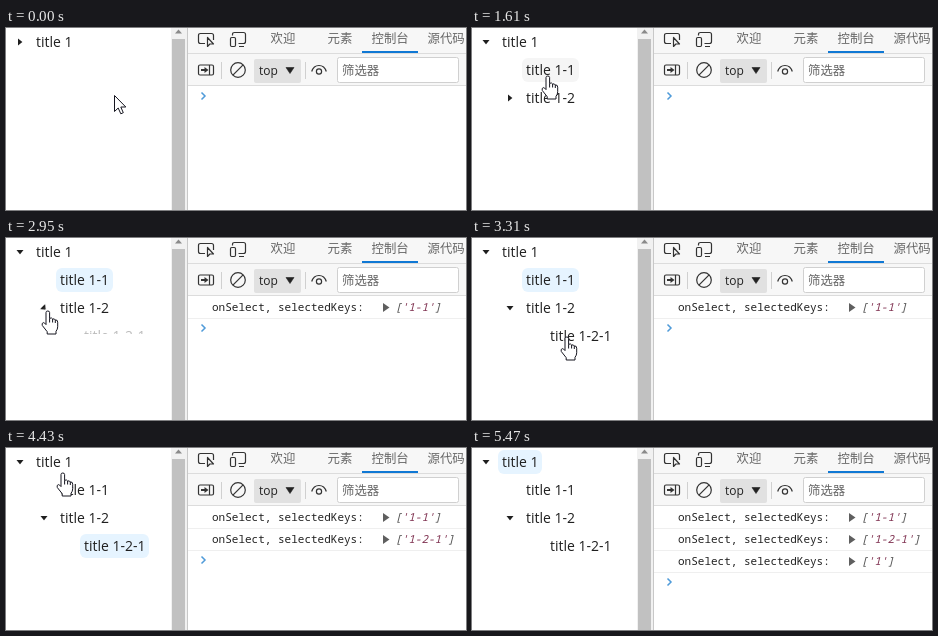
Write an HTML page that moves like this. It is 460x182 px and loops after 5980 ms.

```html
<!DOCTYPE html>
<html lang="zh">
<head>
<meta charset="utf-8">
<title>Tree select demo</title>
<style>
  html, body { margin: 0; width: 100%; height: 100%; overflow: hidden; background: #fff; }
  .stage { position: relative; width: 460px; height: 182px; overflow: hidden; background: #fff; }
  .stage > svg { position: absolute; left: 0; top: 0; }

  /* every moving part shares one clock and changes in hard steps */
  .anim { animation: 5980ms step-end infinite; }

  /* tree */
  .row { position: relative; height: 28px; }
  .row span {
    position: absolute; top: 2px; left: 26px; padding: 0 4px; border-radius: 6px;
    font: 14px/24px "Open Sans", "Noto Sans", sans-serif; color: #1f1f1f; white-space: pre;
  }
  .lvl2 span { left: 50px; }
  .lvl3 span { left: 74px; }
  .caret { position: absolute; left: 9px; top: 9px; width: 10px; height: 10px; }
  .lvl2 .caret { left: 33px; }
  .kids { overflow: hidden; height: 0; opacity: 0; }
  .kids.outer { animation-name: outer; }
  .kids.inner { animation-name: inner; }
  .turn1 { animation-name: turn1; }
  .turn2 { animation-name: turn2; }
  .bg1 { animation-name: bg1; }
  .bg11 { animation-name: bg11; }
  .bg12 { animation-name: bg12; }
  .bg121 { animation-name: bg121; }

  @keyframes outer {
    0% { height: 0; opacity: 0; }
    15.38% { height: 12px; opacity: .13; }
    17.72% { height: 38px; opacity: .65; }
    19.73% { height: 54px; opacity: .95; }
    21.73% { height: 84px; opacity: 1; }
  }
  @keyframes inner {
    0% { height: 0; opacity: 0; }
    49.33% { height: 12px; opacity: .3; }
    51.33% { height: 24px; opacity: .8; }
    53.34% { height: 28px; opacity: 1; }
  }
  @keyframes turn1 {
    0% { transform: none; }
    15.38% { transform: rotate(45deg); }
    17.72% { transform: rotate(78deg); }
    19.73% { transform: rotate(90deg); }
  }
  @keyframes turn2 {
    0% { transform: none; }
    49.33% { transform: rotate(45deg); }
    51.33% { transform: rotate(82deg); }
    53.34% { transform: rotate(90deg); }
  }
  @keyframes bg1 {
    0% { background: #fff; }
    76.58% { background: #f5f5f5; }
    80.76% { background: #e6f4ff; }
  }
  @keyframes bg11 {
    0% { background: #fff; }
    21.73% { background: #f5f5f5; }
    29.26% { background: #e6f4ff; }
    59.53% { background: #f2f9ff; }
    68.06% { background: #fff; }
    72.07% { background: #f8f8f8; }
    74.08% { background: #fff; }
  }
  @keyframes bg12 {
    0% { background: #fff; }
    35.61% { background: #f5f5f5; }
    40.13% { background: #fff; }
    70.06% { background: #f8f8f8; }
    72.07% { background: #fff; }
  }
  @keyframes bg121 {
    0% { background: #fff; }
    59.53% { background: #e6f4ff; }
    80.76% { background: #fff; }
  }

  /* console */
  .ui { font: 12.4px "Noto Sans CJK SC", "Noto Sans CJK", "Noto Sans", sans-serif; fill: #666; }
  .ui.top { font: 12px "Open Sans", "Noto Sans", sans-serif; fill: #222; }
  .log { font: 11px "Noto Sans Mono", "DejaVu Sans Mono", monospace; fill: #222; }
  .log .val { font-style: italic; fill: #555; }
  .log .str { fill: #803352; }
  .log1 { animation-name: log1; }
  .log2 { animation-name: log2; }
  .log3 { animation-name: log3; }
  .prompt { animation-name: prompt; }
  @keyframes log1 { 0% { opacity: 0; } 29.26% { opacity: 1; } }
  @keyframes log2 { 0% { opacity: 0; } 59.53% { opacity: 1; } }
  @keyframes log3 { 0% { opacity: 0; } 80.76% { opacity: 1; } }
  @keyframes prompt {
    0% { transform: none; }
    29.26% { transform: translateY(22px); }
    59.53% { transform: translateY(44px); }
    80.76% { transform: translateY(66px); }
  }

  /* mouse pointer: the origin is its hot spot */
  .pointer { animation-name: move; }
  .arrow { animation-name: arrow; }
  .hand { animation-name: hand; }
  .beam { animation-name: beam; }
  @keyframes move {
    0% { transform: translate(108px, 67px); }
    4.68% { transform: translate(55px, 40px); }
    7.19% { transform: translate(34px, 28px); }
    9.19% { transform: translate(19px, 20px); }
    11.2% { transform: translate(11px, 16px); }
    19.73% { transform: translate(30px, 29px); }
    21.73% { transform: translate(54px, 44px); }
    24.41% { transform: translate(76px, 47px); }
    33.44% { transform: translate(77px, 54px); }
    35.61% { transform: translate(73px, 64px); }
    37.95% { transform: translate(57px, 72px); }
    40.13% { transform: translate(48px, 72px); }
    42.14% { transform: translate(43px, 72px); }
    44.81% { transform: translate(42px, 72px); }
    51.33% { transform: translate(47px, 77px); }
    53.34% { transform: translate(70px, 88px); }
    55.35% { transform: translate(95px, 98px); }
    68.06% { transform: translate(89px, 85px); }
    70.06% { transform: translate(82px, 62px); }
    72.07% { transform: translate(68px, 40px); }
    74.08% { transform: translate(57px, 24px); }
    76.58% { transform: translate(53px, 17px); }
    85.11% { transform: translate(110px, 62px); }
    87.12% { transform: translate(185px, 104px); }
    89.13% { transform: translate(239.5px, 136px); }
  }
  @keyframes arrow {
    0%, 68.06%, 85.11% { opacity: 1; }
    9.19%, 70.06%, 89.13% { opacity: 0; }
  }
  @keyframes hand {
    0%, 68.06%, 85.11% { opacity: 0; }
    9.19%, 70.06% { opacity: 1; }
  }
  @keyframes beam { 0%, 91.47% { opacity: 0; } 89.13% { opacity: 1; } }
</style>
</head>
<body>
<div class="stage">

  <div class="row">
    <svg class="caret anim turn1" viewBox="-5 -5 10 10"><path d="M-2-3.6 2.4 0-2 3.6Z" fill="#1f1f1f"/></svg>
    <span class="anim bg1">title 1</span>
  </div>
  <div class="kids outer anim">
    <div class="row lvl2"><span class="anim bg11">title 1-1</span></div>
    <div class="row lvl2">
      <svg class="caret anim turn2" viewBox="-5 -5 10 10"><path d="M-2-3.6 2.4 0-2 3.6Z" fill="#1f1f1f"/></svg>
      <span class="anim bg12">title 1-2</span>
    </div>
    <div class="kids inner anim">
      <div class="row lvl3"><span class="anim bg121">title 1-2-1</span></div>
    </div>
  </div>

  <svg width="460" height="182" viewBox="0 0 460 182">
    <!-- scrollbar -->
    <path d="M165 0h16v182h-16z" fill="#f1f1f1"/>
    <path d="M166 11h13v171h-13z" fill="#c1c1c1"/>
    <path d="M169 5.5 172.5 1.5 176 5.5Z" fill="#8a8a8a"/>
    <path d="M181.5 0v182" stroke="#c8c8c8"/>

    <!-- toolbars -->
    <path d="M182 0h278v57H182z" fill="#f7f7f7"/>
    <path d="M182 25.5h278M182 57.5h278" stroke="#dcdcdc"/>
    <path d="M356 23h56v2h-56z" fill="#0f78d4"/>
    <g class="ui">
      <text x="264.5" y="15">欢迎</text>
      <text x="321.5" y="15">元素</text>
      <text x="365.5" y="15">控制台</text>
      <text x="421.5" y="15">源代码</text>
    </g>
    <path d="M215.5 34v17M299.5 34v17" stroke="#d0d0d0"/>
    <rect x="248" y="31" width="47" height="24" rx="2" fill="#e1e1e1"/>
    <text class="ui top" x="253" y="47">top</text>
    <path d="M280 39.5h8l-4 6z" fill="#222" stroke="#222" stroke-width=".6" stroke-linejoin="round"/>
    <rect x="331.5" y="29.5" width="121" height="25" rx="2" fill="#fff" stroke="#d0d0d0"/>
    <text class="ui" x="336" y="46.5">筛选器</text>

    <g fill="none" stroke="#333" stroke-width="1.2">
      <path d="M199 15.500h-4.500q-2 0-2-2v-6q0-2 2-2h11q2 0 2 2v4.500"/>
      <path d="M201.500 9.500v9l2.400-2.500h3.600z" stroke-linejoin="round"/>
      <path d="M226.500 7.500v-1q0-2 2-2h9q2 0 2 2v7q0 2-2 2h-5M233 18.500h5"/>
      <rect x="224.500" y="9.500" width="5" height="9" rx="1.200"/>
      <rect x="192.500" y="37" width="15" height="10" rx="1.500"/>
      <path d="M203.500 37v10"/>
      <path d="M195 42h4" stroke-width="2"/>
      <path d="M198.500 39 202.500 42 198.500 45Z" fill="#333" stroke="none"/>
      <circle cx="232" cy="42" r="7.300"/>
      <path d="M226.900 47.100 237.100 36.900"/>
      <path d="M305.700 43.500q1.800-6 7.300-6t7.300 6"/>
      <circle cx="313" cy="43.500" r="2.600"/>
    </g>

    <!-- console messages -->
    <defs>
      <g id="msg">
        <path d="M182 22.5h278" stroke="#efefef"/>
        <text x="206" y="15">onSelect, selectedKeys:</text>
        <path d="M377 7 383.500 11.500 377 16Z" fill="#5f5f5f"/>
      </g>
    </defs>
    <g class="log">
      <g class="anim log1">
        <use href="#msg" y="58"/>
        <text class="val" x="389" y="73">[<tspan class="str">'1-1'</tspan>]</text>
      </g>
      <g class="anim log2">
        <use href="#msg" y="80"/>
        <text class="val" x="389" y="95">[<tspan class="str">'1-2-1'</tspan>]</text>
      </g>
      <g class="anim log3">
        <use href="#msg" y="102"/>
        <text class="val" x="389" y="117">[<tspan class="str">'1'</tspan>]</text>
      </g>
    </g>
    <path class="anim prompt" d="M195.500 64.500 199 68 195.500 71.500" fill="none" stroke="#4f9bd9" stroke-width="1.500"/>

    <!-- pointer -->
    <g class="anim pointer" fill="#fff" stroke="#15151f" stroke-linejoin="round">
      <path class="anim arrow" d="M.5.5V16.500L4.200 13 6.800 18.800 9.300 17.700 6.800 12H11.800Z"/>
      <g class="anim hand">
        <path d="M-2 2.500Q-2 1 -.2 1T1.600 2.500V8.300Q3.800 7.300 4.600 9Q6.600 8.300 7.300 10Q9.700 9.500 9.700 12.200V16.800Q9.700 19.300 8 21.300V24H-.8V21.700L-5.700 15.500Q-6.600 13.200-4.700 12.600Q-3.400 12.600-2 14.600Z"/>
        <path d="M1.600 8.300V12.500M4.600 9V12.500M7.300 10V13" fill="none"/>
      </g>
      <path class="anim beam" d="M-3-7.500H-1.500L0-6.800 1.500-7.500H3M0-6.800V6.800M-3 7.500H-1.500L0 6.800 1.500 7.500H3" fill="none"/>
    </g>
  </svg>
</div>
</body>
</html>
```
